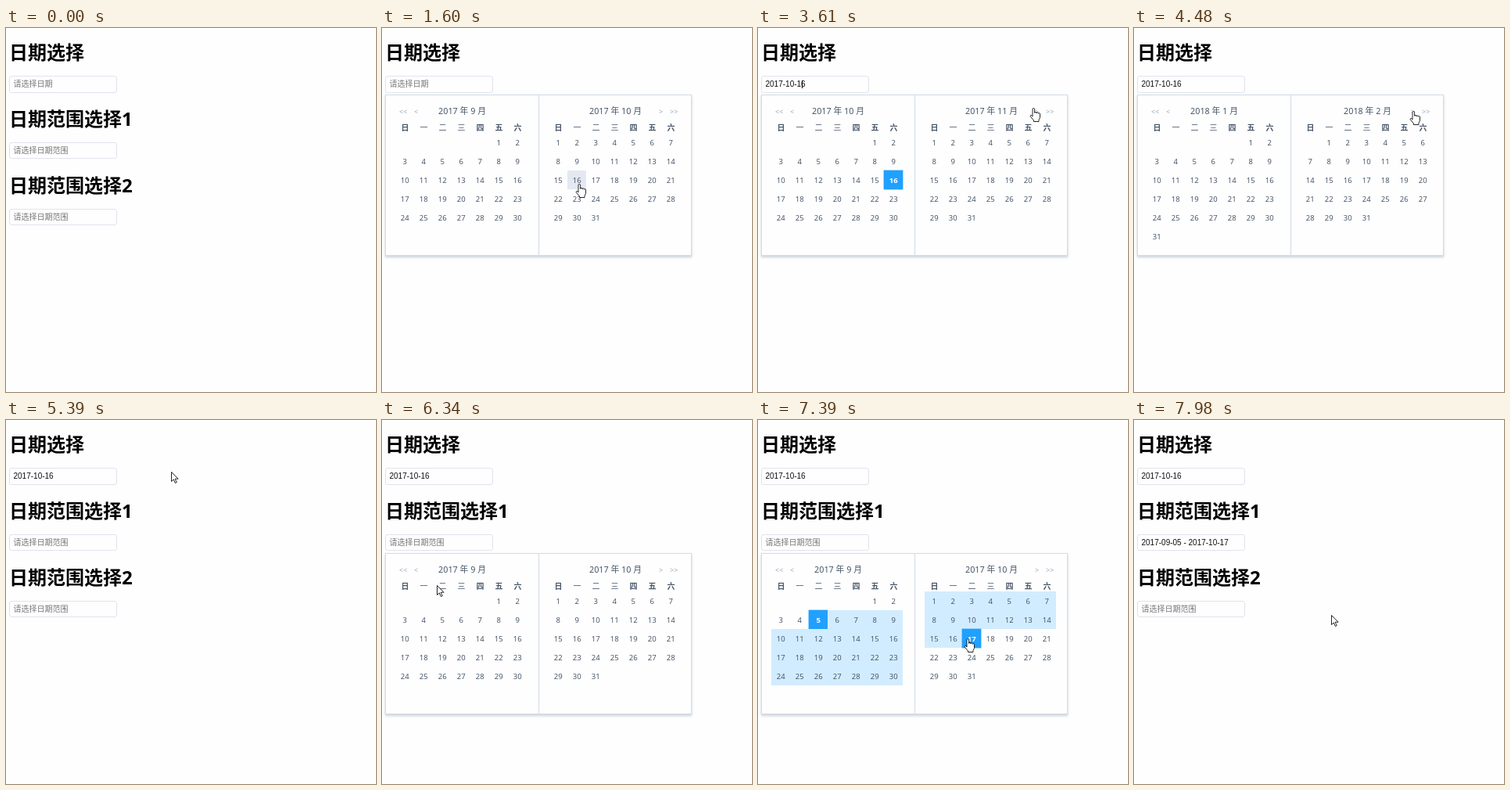
Write an HTML page that moves like this. It is 473 by 465 pixels and loops after 8000 ms.

```html
<!DOCTYPE html>
<html lang="zh-CN">
<head>
<meta charset="utf-8">
<title>日期选择</title>
<style>
  html, body { margin: 0; width: 100%; height: 100%; overflow: hidden; background: #fefefe; }
  body { position: relative; font-family: "Noto Sans", "Noto Sans CJK SC", "Noto Sans CJK", sans-serif; }
  div, h2, svg { position: absolute; box-sizing: border-box; margin: 0; white-space: nowrap; }
  h2 { left: 4px; font-size: 24px; line-height: 32px; font-weight: 700; color: #000; }
  .input {
    left: 4px; width: 138px; height: 21px; padding-left: 4.5px; border: 1px solid #dfe4ec; border-radius: 3px;
    font: 10px/19px "Liberation Sans", "Noto Sans CJK SC", "Noto Sans CJK", sans-serif; color: #111;
  }
  .input.empty { color: #757575; }
  #caret { left: 56px; top: 67px; width: 1px; height: 10px; background: #000; }
  #panel {
    left: 4px; width: 392px; height: 206px; background: #fefefe; color: #48576a;
    border: 1px solid #d1dbe5; box-shadow: 0 2px 3px rgba(110, 130, 150, .35);
  }
  .half { top: 0; width: 195px; height: 204px; }
  .half + .half { left: 195px; width: 196px; padding-left: 1px; border-left: 1px solid #d1dbe5; }
  .title { left: 0; top: 12px; width: 195px; font-size: 10.8px; line-height: 16px; text-align: center; }
  .nav { top: 13px; font-size: 9px; line-height: 15px; color: #97a8be; }
  .week { top: 34px; width: 25px; font-size: 10px; line-height: 14px; text-align: center; font-weight: 600; }
  .week.thin { font-weight: 400; }
  .day { width: 24px; height: 24px; padding-left: .5px; font-size: 9.5px; line-height: 26px; text-align: center; }
  .hover { background: #e4e8f1; }
  .range { background: #d2ecff; }
  .on { background: #20a0ff; box-shadow: 0 0 0 .4px #20a0ff; color: #fff; font-weight: 600; }
  svg { left: 0; top: 0; width: 473px; height: 465px; }
  svg path { fill: #fff; stroke: #000; stroke-width: .85; stroke-linejoin: round; }
  #beam { fill: none; }
</style>
</head>
<body>
<h2 style="top:15px">日期选择</h2>
<h2 style="top:100px">日期范围选择1</h2>
<h2 style="top:185px">日期范围选择2</h2>
<div class="input" style="top:61px;height:22px;line-height:20px"></div>
<div class="input" style="top:146px"></div>
<div class="input empty" style="top:231px">请选择日期范围</div>
<div id="caret"></div>
<div id="panel"></div>
<svg viewBox="0 0 473 465">
  <path id="arrow" d="M.5.5v12l2.8-2.6 2 4.6 1.9-.8-2-4.5h3.9z"/>
  <path id="hand" d="M-1 11V1.8a1.3 1.3 0 0 1 2.6 0V6.4a1.2 1.2 0 0 1 2.4.4a1.2 1.2 0 0 1 2.4.5a1.1 1.1 0 0 1 2.1.6V12.5l-1.5 2.8v2.2H.5V16L-3.6 11.2c-.8-1.2.6-2.4 1.6-1.4z"/>
  <path id="beam" d="M-3-6.5h2l1 1 1-1h2M0-5.5v11M-3 6.5h2l1-1 1 1h2"/>
</svg>
<script>
const LOOP = 8000, CELL = 24;
const $ = id => document.getElementById(id);
const panel = $('panel'), caret = $('caret');
const inputs = [...document.querySelectorAll('.input')];
const cursors = ['arrow', 'hand', 'beam'].map($);

// Pointer moves: start, end, steps, target x, target y
const START = [383, 417];
const MOVES = [
  [120, 700, 9, 69, 62],
  [860, 1000, 3, 68, 74],
  [1150, 1600, 7, 252, 199],
  [1770, 2340, 8, 57, 73],
  [2900, 3470, 9, 345, 108],
  [3540, 3610, 2, 352, 102],
  [3750, 3830, 2, 357, 106],
  [4780, 5150, 6, 211, 66],
  [5460, 5830, 6, 62, 152],
  [5980, 6630, 9, 76, 254],
  [6790, 6990, 3, 182, 295],
  [7070, 7390, 6, 268, 279],
  [7850, 7980, 3, 252, 249]
];
const NEXT_CLICKS = [3970, 4190, 4410, 4710];

const within = (t, a, b) => t >= a && t < b;
const clamp = (v, a, b) => Math.min(b, Math.max(a, v));
const ease = p => p * p * (3 - 2 * p);

function add(parent, cls, text, left, top) {
  const el = document.createElement('div');
  el.className = cls;
  el.textContent = text;
  if (left !== undefined) el.style.left = left + 'px';
  if (top !== undefined) el.style.top = top + 'px';
  return parent.appendChild(el);
}

const halves = [0, 1].map(side => {
  const box = add(panel, 'half', '');
  const title = add(box, 'title', '');
  const navs = side ? [['>', 153], ['>>', 167]] : [['<<', 17], ['<', 36]];
  navs.forEach(([text, x]) => add(box, 'nav', text, x));
  [...'日一二三四五六'].forEach((d, i) =>
    add(box, 'week' + (within(i, 1, 4) ? ' thin' : ''), d, 12 + i * CELL));
  const cells = Array.from({ length: 42 }, (_, i) =>
    add(box, 'day', '', 12 + i % 7 * CELL, 48 + Math.floor(i / 7) * CELL));
  return { title, cells };
});

function pointerAt(t) {
  let [x, y] = START;
  for (const [from, to, steps, tx, ty] of MOVES) {
    if (t < from) break;
    const step = Math.floor((t - from) / (to - from) * (steps - 1) + 1e-6) + 1;
    const p = ease(Math.min(1, step / steps));
    x += (tx - x) * p;
    y += (ty - y) * p;
  }
  return [x, y];
}

function monthInfo(month) {
  const first = new Date(2017, month, 1);
  return {
    first: first.getDay(),
    days: new Date(2017, month + 1, 0).getDate(),
    label: `${first.getFullYear()} 年 ${first.getMonth() + 1} 月`
  };
}

// Date under the pointer as side * 100 + day
function dateAt(x, y, top, months) {
  const side = x < 200.5 ? 0 : 1;
  const col = Math.floor((x - (side ? 213 : 17)) / CELL);
  const row = Math.floor((y - top - 49) / CELL);
  const { first, days } = months[side];
  const day = row * 7 + clamp(col, 0, 6) - first + 1;
  return {
    key: side * 100 + clamp(day, 1, days),
    hit: within(col, 0, 7) && within(row, 0, 6) && within(day, 1, days + 1)
  };
}

function setInput(el, value, hint) {
  el.textContent = value || hint;
  el.classList.toggle('empty', !value);
}

function drawPanel(t, x, y, top) {
  const second = top > 100;
  const shift = second ? 0 : NEXT_CLICKS.filter(c => t >= c).length;
  const grid = 8 + shift;
  // The reopened picker shows its title one month ahead of the day grid
  const ahead = !second && t >= 2500 ? 1 : 0;
  const months = [grid, grid + 1].map(monthInfo);
  const over = dateAt(x, y, top, months);
  const picking = second && t >= 6630;

  const style = key => {
    if (picking) {
      if (key === 5 || key === over.key) return ' on';
      return within(key, 5, over.key) ? ' range' : '';
    }
    if (ahead && !shift && key === 16) return ' on';
    return over.hit && key === over.key ? ' hover' : '';
  };

  halves.forEach(({ title, cells }, side) => {
    const { first, days } = months[side];
    title.textContent = monthInfo(grid + side + ahead).label;
    cells.forEach((cell, i) => {
      const day = i - first + 1, shown = within(day, 1, days + 1);
      cell.textContent = shown ? day : '';
      cell.className = 'day' + (shown ? style(side * 100 + day) : '');
    });
  });

  const onNav = within(y, top + 12, top + 28) && (within(x, 20, 50) || within(x, 350, 382));
  return over.hit || onNav;
}

function render(t) {
  const [x, y] = pointerAt(t);
  const top = within(t, 1150, 1850) || within(t, 2510, 5390) ? 85
    : within(t, 5980, 7850) ? 170 : 0;

  setInput(inputs[0], t >= 1770 && '2017-10-16', '请选择日期');
  setInput(inputs[1], t >= 7620 && '2017-09-05 - 2017-10-17', '请选择日期范围');
  const blink = within(t, 2510, 3040) || within(t, 3570, 3750);
  caret.style.display = blink ? '' : 'none';

  panel.style.display = top ? '' : 'none';
  panel.style.top = top + 'px';
  const clickable = top && drawPanel(t, x, y, top);

  const covered = top && y >= top;
  const inInput = !covered && within(x, 4, 142) && [61, 146, 231].some(v => within(y, v, v + 22));
  const kind = inInput ? 2 : clickable ? 1 : 0;
  cursors.forEach((el, i) => {
    el.style.display = t >= 120 && i === kind ? '' : 'none';
    el.setAttribute('transform', `translate(${Math.round(x)} ${Math.round(y)})`);
  });
}

const began = performance.now();
function tick() {
  render((performance.now() - began) % LOOP);
  requestAnimationFrame(tick);
}
tick();
</script>
</body>
</html>
```
